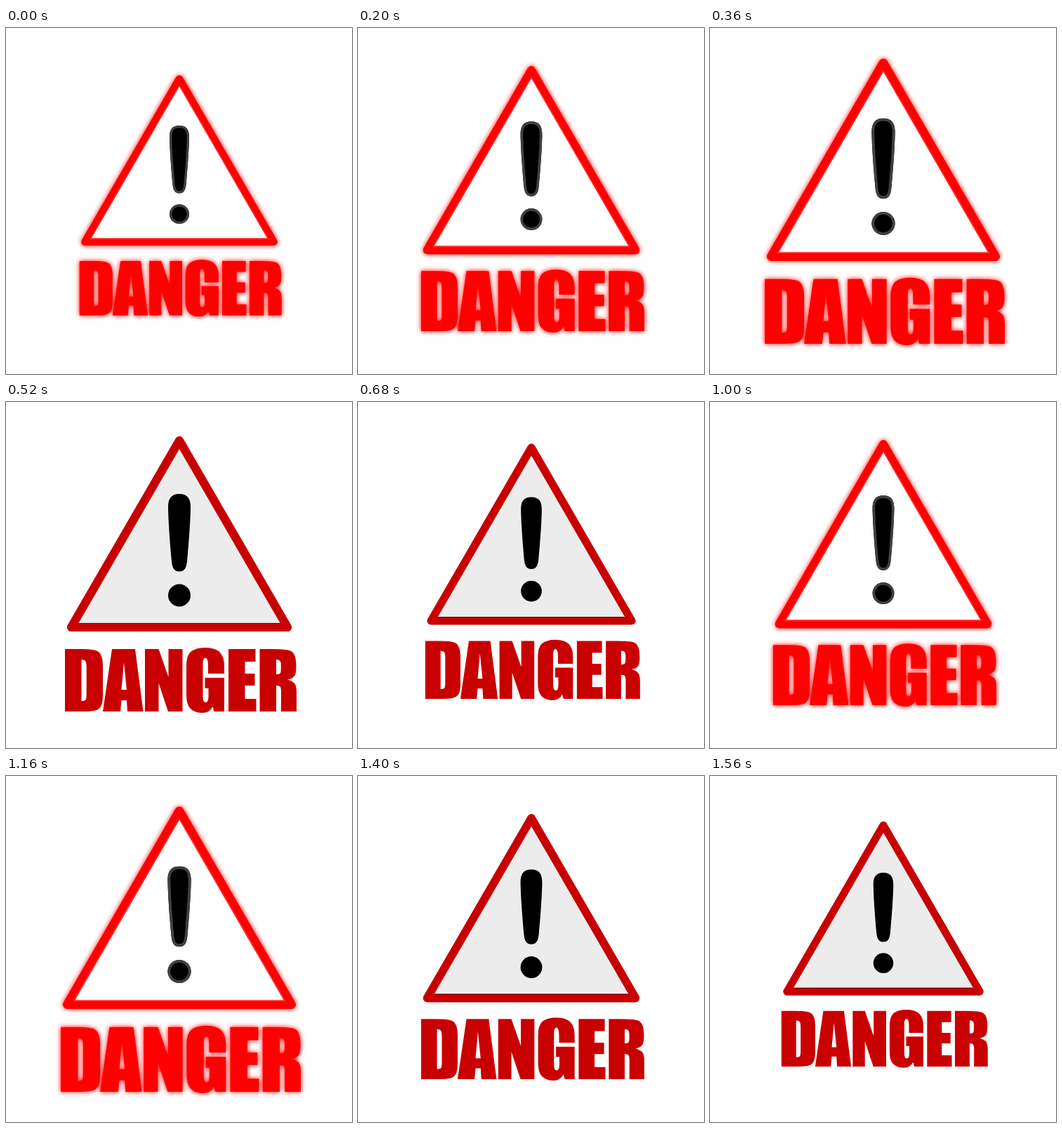
Write an HTML page with a canvas that moves like this. It is 493 by 493 pixels and loops after 1.6 s.

```html
<!DOCTYPE html>
<html lang="en">
<head>
<meta charset="utf-8">
<title>Danger</title>
<style>
  html, body { margin: 0; height: 100%; overflow: hidden; background: #fff; }
  canvas { display: block; }
</style>
</head>
<body>
<canvas id="stage" width="493" height="493" role="img" aria-label="DANGER"></canvas>
<script>
const ctx = document.getElementById('stage').getContext('2d');

const STEP = 40, STEPS = 20, HALF = STEPS / 2;
const CX = 247, CY = 194;

const triangle = new Path2D('M247 55L401 321H93Z');
const innerEdge = new Path2D('M247 65.5L392 315.8H102Z');
const baseLine = new Path2D('M104 315.4H390');
const mark = new Path2D(
  'M247 131C259 131 263.5 138 263 152C262.5 175 260 205 258 227C257 237 254 241.5 247 241.5' +
  'C240 241.5 237 237 236 227C234 205 231.5 175 231 152C230.5 138 235 131 247 131Z' +
  'M263 275.5A16 16 0 1 1 231 275.5A16 16 0 1 1 263 275.5Z');

// Heavy condensed lettering: D A N G E R
const word = new Path2D([
  'M84 352H107Q128 352 132.5 356.5Q137.5 361 138 374V418Q138 432 133 436.5Q129 441 111 441H84Z' +
  'M107.5 367V426Q112.5 426 113.7 424Q114.7 422 114.7 414V378Q114.7 371 113 369Q112 367.5 107.5 367Z',
  'M151 352H184L195.5 441H173L172 425H164.5L163 441H138ZM168 371L164.5 410H172Z',
  'M198 352H217.5L231.5 392V352H251.5V441H231L217.5 400.5V441H198Z',
  'M311 387H288V377Q288 364.5 284 364.5Q280.5 365 280.5 372V420Q280.5 428 284.5 428' +
  'Q288.5 428 288.5 419V408H283.5V393H311V441H296.5L294.5 434Q290 443 279.5 443' +
  'Q268 443 262 436Q257 430 257 417V376Q257 362 263 356Q270 350 284 350Q298 350 304.5 356.5Q311 363 311 376Z',
  'M317 352H355.5V370H340.5V387H354.5V404H340.5V423H356.5V441H317Z',
  'M361.5 352H378Q403 352 407 355.5Q413.5 359.5 413.5 377Q413.5 388 410.5 391Q408 394.5 401 395.5' +
  'Q409 398 411.5 401.5Q414 405 414 415V441H392V413Q392 407 390.5 405.5Q389.3 404 385 404V441H361.5Z' +
  'M385 367V388Q389 388 390.3 387Q391.8 385.5 391.8 380V374Q391.8 370 390 368.5Q388.5 367 385 367Z'
].join(''));

function fill(path, color) {
  ctx.fillStyle = color;
  ctx.fill(path, 'evenodd');
}

function stroke(path, color, width) {
  ctx.strokeStyle = color;
  ctx.lineWidth = width;
  ctx.stroke(path);
}

function setGlow(on) {
  ctx.shadowColor = on ? '#f00' : 'transparent';
  ctx.shadowBlur = on ? 7 : 0;
}

function draw(step) {
  const glowing = step < HALF;
  const size = HALF - Math.abs(HALF - step);
  const scale = (48 + size) / 55;
  const red = glowing ? '#f00' : '#c80000';

  ctx.setTransform(1, 0, 0, 1, 0, 0);
  ctx.clearRect(0, 0, 493, 493);
  ctx.setTransform(scale, 0, 0, scale, CX * (1 - scale), CY * (1 - scale));
  ctx.lineJoin = 'round';

  setGlow(glowing);
  fill(word, red);
  stroke(triangle, red, 12);
  setGlow(false);

  fill(triangle, glowing ? '#fff' : '#ececec');
  stroke(triangle, red, 12);
  if (glowing) stroke(innerEdge, '#ff3030', 1.6);
  else stroke(baseLine, '#3a1010', 0.9);

  fill(mark, '#000');
  if (glowing) {
    ctx.save();
    ctx.clip(mark);
    stroke(mark, '#404040', 7.5);
    ctx.restore();
  }
}

function tick() {
  draw(Math.floor(performance.now() / STEP) % STEPS);
  requestAnimationFrame(tick);
}
tick();
</script>
</body>
</html>
```
